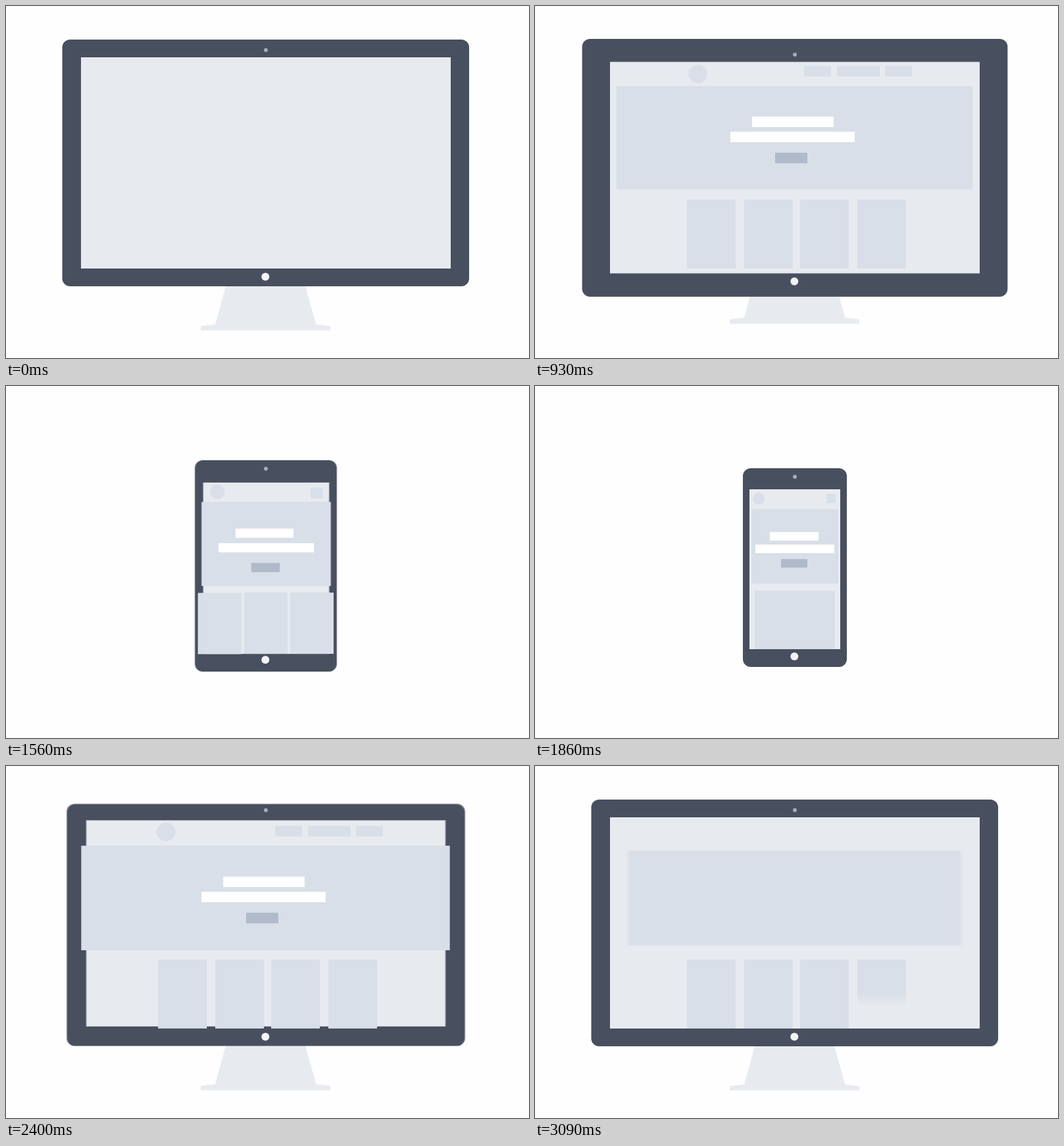
Animation of 795 by 535 pixels, one loop 3420 ms. Source, as an HTML page with a canvas:

```html
<!DOCTYPE html>
<html lang="en">
<head>
<meta charset="utf-8">
<title>Responsive layout</title>
<style>
html, body { margin: 0; width: 100%; height: 100%; overflow: hidden; background: #fefefe; }
canvas { display: block; }
</style>
</head>
<body>
<canvas id="stage" width="795" height="535"></canvas>
<script>
const W = 795, H = 535, LOOP = 3420, STEP = 30, SHUTTER = 15, SAMPLES = 6;
const DARK = '#484f5e', PALE = '#e7ebf0', BLOCK = '#d8dfe8', CTA = '#b1bacb', PAPER = '#fefefe';

const view = document.getElementById('stage').getContext('2d');
const layer = document.createElement('canvas');
layer.width = W;
layer.height = H;
const ctx = layer.getContext('2d');

// Rectangles are x, y, width, height and, where a part fades, opacity.
const hide = r => [...r.slice(0, 4), 0];

const desk = {
  body: [85.5, 51, 618.5, 375], screen: [114, 78, 562, 321],
  cam: [67], home: [411.5], stand: [0], logo: [243, 100, 14],
  hero: [114, 121, 561, 159],
  title: [330, 168, 124, 16], sub: [297, 191, 189, 16], cta: [365, 223, 49, 16],
  nav1: [409, 91, 41, 16, 1], nav2: [459, 91, 65, 16, 1], nav3: [532, 91, 41, 16, 1],
  card1: [231, 294, 74, 105, 1], card2: [318, 294, 74, 105, 1],
  card3: [403, 294, 74, 105, 1], card4: [490, 294, 74, 105, 1]
};
const swollen = {
  ...desk, body: [71.5, 50, 647, 392], screen: [114, 85.5, 562, 321.5],
  cam: [74.5], home: [419], stand: [-11], logo: [248, 104, 14],
  hero: [125, 122, 539, 156.5]
};
const compact = {
  ...desk, stand: [-75],
  nav2: hide(desk.nav2), nav3: hide(desk.nav3), card4: hide(desk.card4)
};
const landscape = {
  ...compact, body: [202, 97, 386, 349], screen: [219.5, 125, 351.5, 297.5],
  cam: [107], home: [435.5], logo: [291, 136, 13], hero: [229, 151, 332, 144],
  nav1: [443, 115, 29, 16, 1],
  card1: [271, 308, 69, 96, 1], card2: [347, 307, 69, 97, 1], card3: [422, 307, 69, 97, 1]
};
const portrait = {
  ...compact, body: [288, 113, 214, 321], screen: [300.5, 147, 190, 260],
  cam: [126], home: [416], logo: [321.5, 161, 11], hero: [298, 176.5, 195, 127.5],
  title: [349, 217, 88, 14], sub: [323, 239, 145, 14], cta: [373, 269, 43, 14],
  nav1: [463, 155, 18, 16, 1],
  card1: [292, 314.5, 66, 93, 1], card2: [362, 314, 66, 93, 1], card3: [432, 314, 66, 93, 1]
};
const phone = {
  ...compact, body: [316, 125, 158, 302], screen: [326, 157, 138, 243],
  cam: [138], home: [411], logo: [340, 171, 9], hero: [329, 187, 132, 113],
  title: [357, 222, 74, 13], sub: [335, 241, 120, 13], cta: [374, 263, 40, 13],
  nav1: [443, 164, 14, 14, 1],
  card1: [334, 311, 122, 89, 1], card2: [362, 312, 66, 88, 0], card3: [396, 312, 66, 88, 0]
};
const regrown = {
  ...compact, body: [194, 107.5, 402, 326.5], screen: [212, 130, 367, 273],
  cam: [120], home: [417], stand: [-62], logo: [305.5, 151, 11.5],
  hero: [229, 163, 332, 129.5],
  title: [352, 203, 82, 14], sub: [323, 223, 140, 14], cta: [371, 247, 42, 14],
  nav1: hide(desk.nav1),
  card1: [282, 303, 89, 91, 1], card2: [338, 303, 71, 99, .4], card3: [416, 303, 71, 99, .4]
};
const settling = {
  ...desk, body: [91.5, 57, 607, 368.5], screen: [121, 82, 548, 314]
};

const blend = (a, b, k) => Object.fromEntries(Object.keys(a).map(
  name => [name, a[name].map((v, i) => v + (b[name][i] - v) * k)]));

const keys = [
  [780, desk], [930, swollen], [1170, landscape], [1350, blend(landscape, portrait, .72)],
  [1560, portrait], [1800, phone], [1860, phone], [2160, regrown],
  [2400, settling], [2520, desk]
];

const clamp = v => Math.min(1, Math.max(0, v));
const easeOut = (v, n = 3) => 1 - (1 - clamp(v)) ** n;

// Monotone cubic through the key poses.
function poseAt(t) {
  if (t <= keys[0][0] || t >= keys[keys.length - 1][0]) return desk;
  const n = keys.findIndex(k => k[0] > t) - 1;
  const span = keys[n + 1][0] - keys[n][0];
  const u = (t - keys[n][0]) / span;
  const pose = {};
  for (const name in desk) {
    pose[name] = desk[name].map((_, i) => {
      const val = k => keys[k][1][name][i];
      const slope = k => keys[k + 1] && keys[k] ? (val(k + 1) - val(k)) / (keys[k + 1][0] - keys[k][0]) : 0;
      const tangent = k => {
        const a = slope(k - 1), b = slope(k);
        return a * b > 0 ? 2 * a * b / (a + b) : 0;
      };
      const u2 = u * u, u3 = u2 * u;
      return val(n) * (2 * u3 - 3 * u2 + 1) + val(n + 1) * (3 * u2 - 2 * u3)
        + span * (tangent(n) * (u3 - 2 * u2 + u) + tangent(n + 1) * (u3 - u2));
    });
  }
  return pose;
}

function box([x, y, w, h, alpha = 1], color, sx = 1, sy = 1) {
  ctx.globalAlpha = clamp(alpha);
  ctx.fillStyle = color;
  ctx.fillRect(x, y, w * sx, h * sy);
  ctx.globalAlpha = 1;
}

function dot(x, y, r, color) {
  ctx.fillStyle = color;
  ctx.beginPath();
  ctx.arc(x, y, r, 0, 7);
  ctx.fill();
}

function drawStand(dy) {
  ctx.fillStyle = PALE;
  ctx.beginPath();
  [[334, 426], [455, 426], [471.5, 484], [493, 486.5], [493, 493], [296, 493], [296, 486.5], [318, 484]]
    .forEach(([x, y]) => ctx.lineTo(x, y + dy));
  ctx.fill();
}

function drawBurst(x, y, t) {
  const e = (t - 1070) / 250;
  if (e <= 0 || e >= 1) return;
  const tip = 90 * easeOut(e, 2) - 3, tail = Math.min(tip, 90 * e ** 1.3 + 3);
  ctx.lineCap = 'round';
  for (const [color, width] of [['#b5d9f0', 6.5], ['#fff', 5]]) {
    ctx.strokeStyle = color;
    ctx.lineWidth = width;
    for (let i = 0; i < 5; i++) {
      const a = -Math.PI / 2 + i * Math.PI * .4;
      ctx.beginPath();
      ctx.moveTo(x + tail * Math.cos(a), y + tail * Math.sin(a));
      ctx.lineTo(x + tip * Math.cos(a), y + tip * Math.sin(a));
      ctx.stroke();
    }
  }
}

function draw(t) {
  const p = poseAt(t);
  // The page builds up once, then the same build runs backwards.
  const built = t < 2760 ? t - 150 : 510 - (t - 2760);
  const shown = (start, length) => clamp((built - start) / length);

  ctx.fillStyle = PAPER;
  ctx.fillRect(0, 0, W, H);
  if (p.body[2] > 200) drawStand(p.stand[0]);
  ctx.fillStyle = DARK;
  ctx.beginPath();
  ctx.roundRect(...p.body, 12);
  ctx.fill();
  box(p.screen, PALE);
  dot(395, p.cam[0], 3, '#a9adb4');
  dot(394.3, p.home[0], 6, '#f1f3f5');

  const [x, y, w, h] = p.hero, s = easeOut(built / 350);
  box([x + w * (1 - s) / 2, y + h * (1 - s) / 2, w * s, h * s], BLOCK);
  for (let i = 3; i >= 0; i--) {
    box(p['card' + (i + 1)], BLOCK, 1, shown(5 + 46 * i, 80));
  }
  dot(p.logo[0], p.logo[1], p.logo[2] * easeOut(shown(210, 120)), BLOCK);
  for (let i = 0; i < 3; i++) {
    box(p['nav' + (i + 1)], BLOCK, easeOut(shown(230 + 50 * i, 100)));
  }
  box(p.title, '#fff', easeOut(shown(250, 150)));
  box(p.sub, '#fff', easeOut(shown(300, 150)));
  box(p.cta, CTA, easeOut(shown(380, 130)));

  drawBurst(528.5, 114, t);
  drawBurst(215, 443, t);
}

// Averages a few moments inside each step for motion blur.
function render(now) {
  const t = Math.min(3090, Math.floor(now % LOOP / STEP) * STEP);
  for (let i = 0; i < SAMPLES; i++) {
    draw(t - SHUTTER * i / (SAMPLES - 1));
    view.globalAlpha = 1 / (i + 1);
    view.drawImage(layer, 0, 0);
  }
}

const start = performance.now();
function tick() {
  render(performance.now() - start);
  requestAnimationFrame(tick);
}
tick();
</script>
</body>
</html>
```
